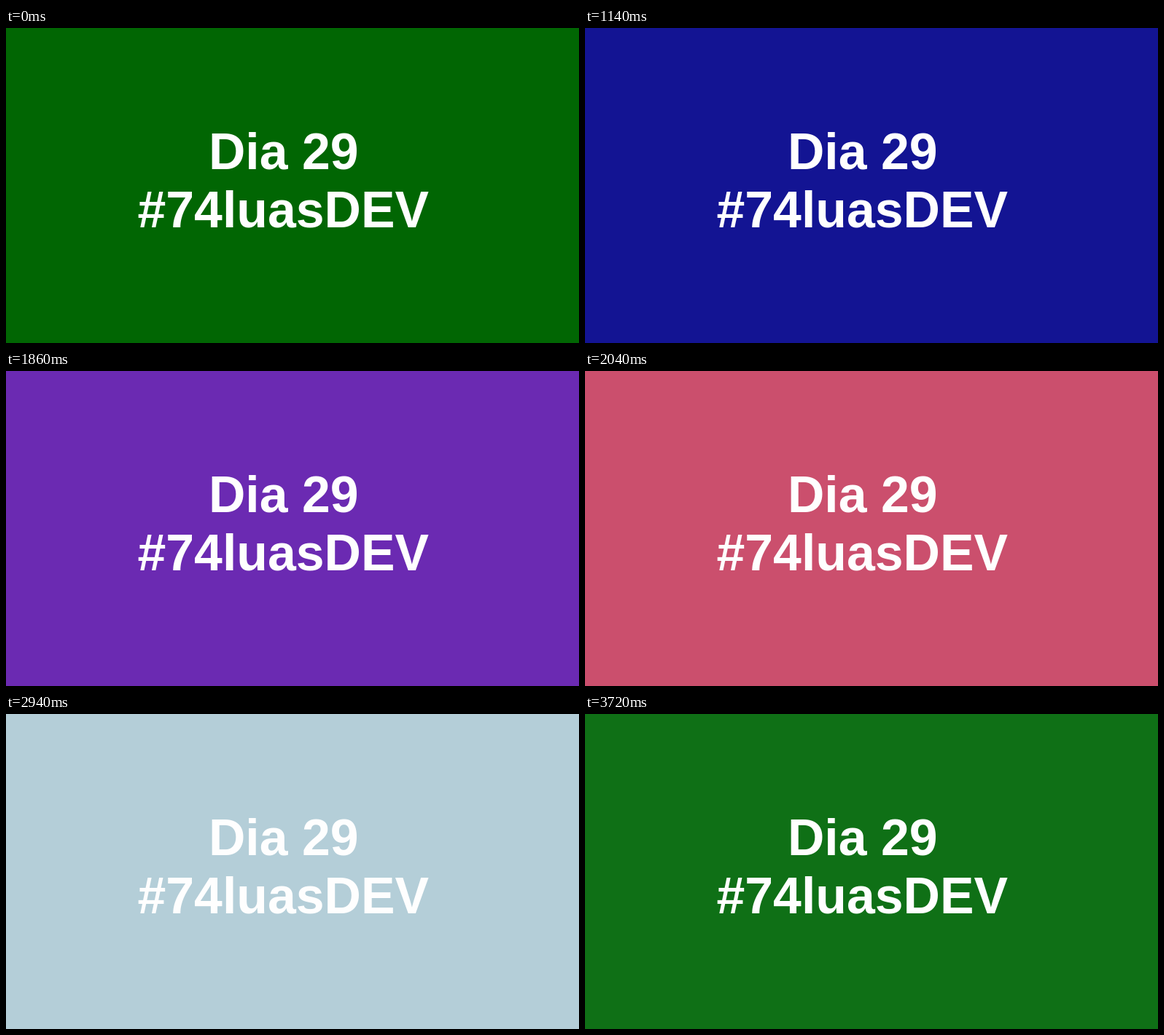
Write an HTML page that moves like this. It is 786 by 433 pixels and loops after 3780 ms.

```html
<!DOCTYPE html>
<html lang="pt">
<head>
<meta charset="utf-8">
<title>Dia 29</title>
<style>
  html, body { margin: 0; width: 100%; height: 100%; overflow: hidden; background: #026604; }
  svg { display: block; width: 786px; height: 433px; }
  text {
    font: bold 69.8px "Liberation Sans", Arial, sans-serif;
    fill: #fefefe;
    text-anchor: middle;
  }
</style>
</head>
<body>
<svg viewBox="0 0 786 433">
  <rect id="bg" width="786" height="433" fill="#026604"/>
  <text x="380.8" y="194">Dia 29</text>
  <text x="380.3" y="274">#74luasDEV</text>
</svg>
<script>
const LOOP = 3780, STEP = 60;
const green = [1, 102, 3], dark = [39, 40, 38], blue = [0, 0, 255],
      tomato = [255, 99, 71], sky = [173, 216, 230];

// Each fade: start, duration, time at which the colour settles, from, to
const fades = [
  [240, 360, 540, green, dark],
  [920, 747, 1660, dark, blue],
  [1667, 756, 2340, blue, tomato],
  [2452, 756, 2940, tomato, sky],
  [3228, 756, 3720, sky, green]
];

// The CSS "ease" curve, cubic-bezier(.25, .1, .25, 1)
const bezier = (a, b, s) => 3 * a * s * (1 - s) ** 2 + 3 * b * s * s * (1 - s) + s ** 3;
function ease(x) {
  let lo = 0, hi = 1;
  for (let i = 0; i < 24; i++) {
    const mid = (lo + hi) / 2;
    if (bezier(.25, .25, mid) < x) lo = mid; else hi = mid;
  }
  return bezier(.1, 1, lo);
}

function colorAt(t) {
  if (t < 300) return green;
  const fade = fades.filter(f => f[0] <= t).pop();
  const [start, length, settle, from, to] = fade;
  const k = ease(Math.min(1, (Math.min(t, settle) - start) / length));
  return from.map((c, i) => Math.round(c + (to[i] - c) * k));
}

const bg = document.getElementById("bg");
function draw() {
  const t = Math.floor(performance.now() % LOOP / STEP) * STEP;
  bg.setAttribute("fill", `rgb(${colorAt(t)})`);
  requestAnimationFrame(draw);
}
draw();
</script>
</body>
</html>
```
